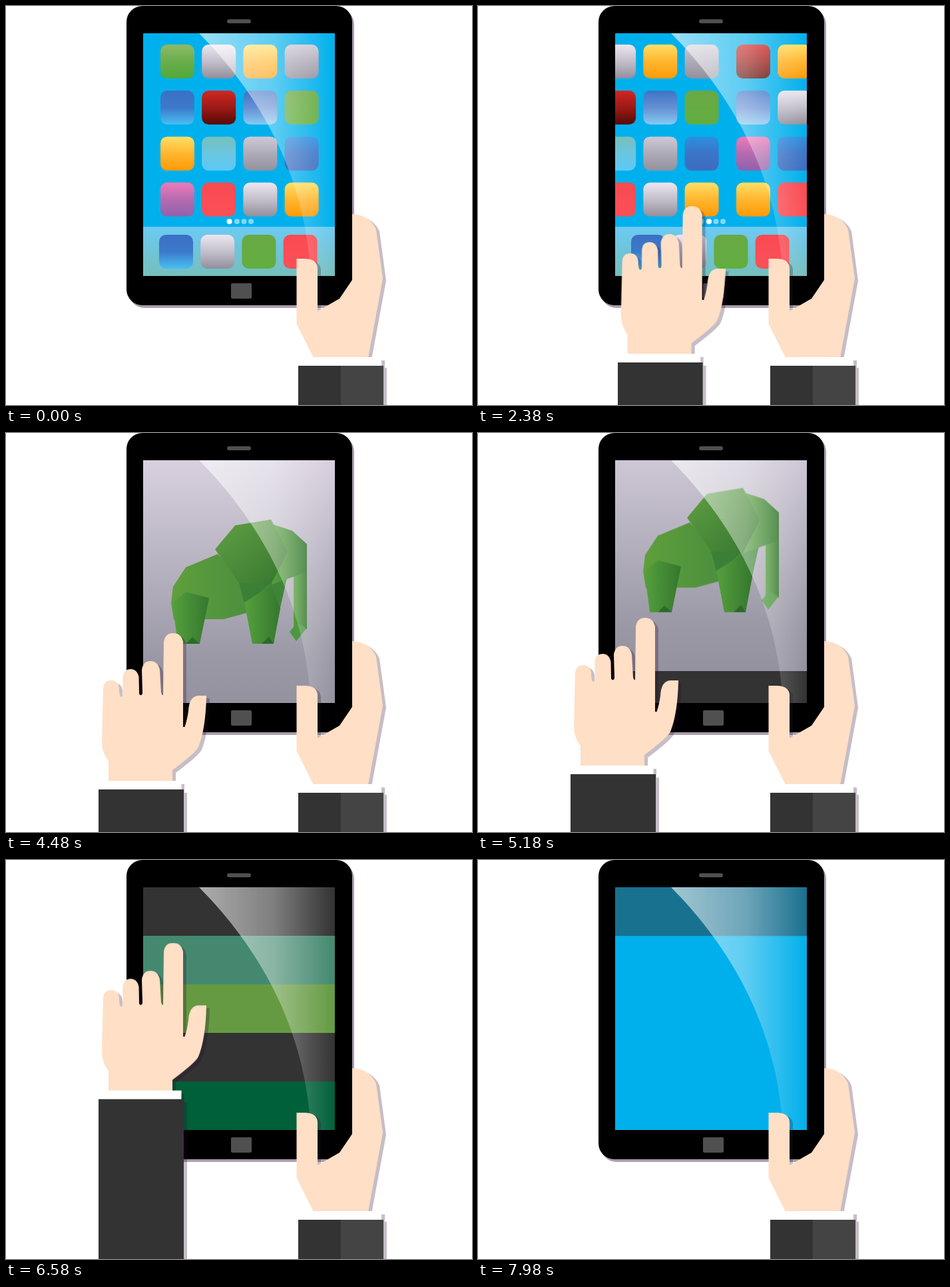
Write an HTML page that moves like this. It is 700 px wide and 600 px high and loops after 8 s.

```html
<!DOCTYPE html>
<html lang="en">
<head>
<meta charset="utf-8">
<title>Tablet gestures</title>
<style>
  html, body { margin: 0; width: 100%; height: 100%; overflow: hidden; background: #fff; }
  svg { display: block; width: 100%; height: 100%; }

  .anim { animation: 8s linear infinite; }
  .skin { fill: #ffdfc5; }
  .shade { fill: #2b0c30; opacity: .27; }

  #hand-y { animation-name: hand-y; }
  #hand-x { animation-name: hand-x; }
  #pages { animation-name: pages; }
  #home { animation-name: home; }
  #dot-1 { animation-name: dot-1; }
  #dot-2 { animation-name: dot-2; }
  #scroll { animation-name: scroll; }
  #card { animation-name: card; transform-origin: 350px 223.5px; }
  #card-fade { animation-name: card-fade; }

  @keyframes hand-y {
    0%, 3% { transform: translateY(310px); animation-timing-function: cubic-bezier(.8, 0, .68, 1); }
    17.5% { transform: translateY(0); }
    56% { transform: translateY(0); animation-timing-function: cubic-bezier(.8, 0, .68, 1); }
    77% { transform: translateY(-176.5px); }
    82% { transform: translateY(-176.5px); animation-timing-function: cubic-bezier(.8, 0, .68, 1); }
    96.25%, 100% { transform: translateY(310px); }
  }
  @keyframes hand-x {
    0%, 17.5% { transform: translateX(119.5px); animation-timing-function: cubic-bezier(.8, 0, .68, 1); }
    36.75%, 100% { transform: translateX(0); }
  }
  @keyframes pages {
    0%, 17.5% { transform: translateX(0); animation-timing-function: cubic-bezier(.8, 0, .68, 1); }
    36.75%, 100% { transform: translateX(-264px); }
  }
  @keyframes scroll {
    0%, 56% { transform: translateY(0); animation-timing-function: cubic-bezier(.8, 0, .68, 1); }
    77%, 100% { transform: translateY(-365px); }
  }
  @keyframes home {
    0%, 54.99% { visibility: visible; }
    55%, 100% { visibility: hidden; }
  }
  @keyframes dot-1 { 0%, 17.5% { opacity: 1; } 19.5%, 100% { opacity: .5; } }
  @keyframes dot-2 { 0%, 21% { opacity: .5; } 24%, 100% { opacity: 1; } }
  @keyframes card {
    0%, 39.375% { transform: scale(0); animation-timing-function: cubic-bezier(.16, 1, .3, 1); }
    47%, 100% { transform: scale(1); }
  }
  @keyframes card-fade { 0%, 39.375% { opacity: 0; } 41.1% { opacity: .94; } 44%, 100% { opacity: 1; } }
</style>
</head>
<body>
<svg viewBox="0 0 700 600">
  <defs id="defs">
    <clipPath id="screen"><rect x="206" y="41" width="288" height="365"/></clipPath>
    <linearGradient id="gloss" gradientUnits="userSpaceOnUse" x1="290" x2="494" y1="0" y2="0">
      <stop stop-color="#fff" stop-opacity=".6"/>
      <stop offset=".55" stop-color="#fff" stop-opacity=".37"/>
      <stop offset="1" stop-color="#fff" stop-opacity="0"/>
    </linearGradient>
    <linearGradient id="paper" x2="0" y2="1">
      <stop stop-color="#d8d0df"/>
      <stop offset=".82" stop-color="#9a98a5"/>
      <stop offset="1" stop-color="#94929f"/>
    </linearGradient>
    <linearGradient id="hide"><stop stop-color="#5f9f3c"/><stop offset="1" stop-color="#468a3e"/></linearGradient>
    <linearGradient id="leg"><stop stop-color="#55a03c"/><stop offset="1" stop-color="#35772f"/></linearGradient>
    <linearGradient id="ear" y2="1"><stop stop-color="#62a043"/><stop offset="1" stop-color="#35762f"/></linearGradient>
    <path id="left-skin" d="M154 524V494Q144 480 144 465L146 384Q147 372 158 372T170 384Q170 396 173 397Q176 396 175.500 390V366Q177 355 187 355T199.500 367L200 392Q201 395 203 394Q205 394 205 390L204 356Q206 343 217 343T231 356L233 390Q234 395 236 394L237 314Q239 301 251 301T266 314V442H268.500Q272 432 274 418Q275 395 290 395H301Q300 445 289 472Q286 480 250 507V524Z"/>
    <path id="right-skin" d="M436.500 380H450Q468 381 468 395V459L501 440L520 412V313Q546 314 556 336L566 410L544 529H462L436.500 478Z"/>
  </defs>

  <rect x="184" y="4" width="339" height="450" rx="24" fill="#2b0c30" opacity=".4"/>
  <rect x="181" width="339" height="450" rx="24"/>
  <rect x="332" y="20" width="36" height="6" rx="3" fill="#505050"/>
  <rect x="338" y="417" width="31" height="23" rx="2" fill="#505050"/>

  <g clip-path="url(#screen)">
    <rect x="206" y="41" width="288" height="365" fill="#00b0ec"/>
    <g id="home" class="anim">
      <g id="pages" class="anim"></g>
      <g fill="#fff">
        <circle id="dot-1" class="anim" cx="335.500" cy="324" r="4"/>
        <circle id="dot-2" class="anim" cx="347" cy="324" r="4"/>
        <circle cx="357.500" cy="324" r="4" opacity=".5"/>
        <circle cx="368" cy="324" r="4" opacity=".5"/>
      </g>
      <g id="dock"></g>
    </g>
    <g id="scroll" class="anim">
      <g id="card" class="anim"><g id="card-fade" class="anim">
        <rect x="206" y="41" width="288" height="365" fill="url(#paper)"/>
        <g transform="translate(0 49)">
          <path fill="url(#hide)" d="M270 153L318 133L350 168L400 176L395 195L360 222L327 231H300L290 235L252 232L248 207L251 182Z"/>
          <path fill="#2f7434" d="M350 176H398L380 192L358 206Z" opacity=".55"/>
          <path fill="#3f8539" d="M398 179L422 169L411 218L404 230Z"/>
          <path fill="url(#leg)" d="M250 206L270 190L305 199L291 268H258Z"/>
          <path fill="url(#leg)" d="M358 206L398 180L412 215L402 268H370Z"/>
          <path fill="#2b6a2b" d="M270 268L280 258L291 268ZM384 268L395 257L402 268Z"/>
          <path fill="url(#leg)" d="M432 163L452 157V246L432 244Z"/>
          <path fill="#4d9740" d="M438 236L451 245L436 264L426 250Z"/>
          <path fill="url(#leg)" d="M400 88L430 98L452 118V160L398 179L424 130Z"/>
          <path fill="url(#ear)" d="M344 90L398 81L424 130L398 179L350 176L314 126Z"/>
        </g>
      </g></g>
      <g id="stripes"></g>
    </g>
    <path fill="url(#gloss)" d="M290 41C378 130 450 250 458 406H494V41Z"/>
  </g>

  <g class="shade">
    <use href="#right-skin" x="5" y="3"/>
    <path d="M444 533H569V544H572V600H444Z"/>
  </g>
  <use href="#right-skin" class="skin"/>
  <rect x="439" y="528" width="125" height="14" fill="#fff"/>
  <rect x="439" y="541" width="128" height="59" fill="#333"/>
  <rect x="503" y="541" width="64" height="59" fill="#444"/>

  <g id="hand-y" class="anim"><g id="hand-x" class="anim">
    <g class="shade">
      <use href="#left-skin" x="5" y="4"/>
      <path d="M144 528H268V541H272V800H144Z"/>
    </g>
    <use href="#left-skin" class="skin"/>
    <rect x="139" y="523" width="124.500" height="14" fill="#fff"/>
    <rect x="139" y="536" width="128" height="264" fill="#333"/>
  </g></g>
</svg>
<script>
  const byId = id => document.getElementById(id);

  function add(parent, tag, attrs) {
    const el = document.createElementNS('http://www.w3.org/2000/svg', tag);
    for (const key in attrs) el.setAttribute(key, attrs[key]);
    return parent.appendChild(el);
  }

  // Vertical gradients: evenly spaced stops from top to bottom.
  const paints = {
    leaf: ['#8dbb66', '#6bad4b', '#50a93a'],
    grass: ['#6aa945', '#62ae40'],
    silver: ['#ece6f0', '#c3bfca', '#918f9c'],
    ash: ['#cec9d6', '#aeabb8', '#93919e'],
    amber: ['#ffe066', '#ffb62e', '#ff9a08'],
    blue: ['#3a70c4', '#3c79ca', '#48bff2'],
    haze: ['#3c73c5', '#6690d4', '#86caf2'],
    deep: ['#2b90e0', '#3c75c8', '#3c6cc0'],
    wine: ['#d02824', '#9c1a16', '#560a06'],
    sky: ['#76c0ba', '#6ac6e0', '#5cc9f6'],
    orchid: ['#ef7ab9', '#b56bb0', '#9062aa'],
    coral: ['#fa4a52', '#fb5058'],
    tray: ['#6ccaf3', '#70c4d8', '#75bfbc']
  };
  for (const name in paints) {
    const gradient = add(byId('defs'), 'linearGradient', { id: name, x2: 0, y2: 1 });
    paints[name].forEach((color, i, list) =>
      add(gradient, 'stop', { offset: i / (list.length - 1), 'stop-color': color }));
  }

  function addIcons(parent, x, y, names) {
    names.split(' ').forEach((name, i) => add(parent, 'rect', {
      x: x + i % 4 * 62.2, y: y + Math.floor(i / 4) * 69.2,
      width: 51, height: 51, rx: 10, fill: `url(#${name})`
    }));
  }

  addIcons(byId('pages'), 232, 58,
    'leaf silver amber ash blue wine haze grass amber sky ash deep orchid coral silver amber');
  addIcons(byId('pages'), 496, 58,
    'wine amber leaf ash haze silver blue grass orchid deep ash coral amber coral silver amber');

  add(byId('dock'), 'rect', { x: 206, y: 332, width: 288, height: 74, fill: 'url(#tray)' });
  addIcons(byId('dock'), 230, 344, 'blue silver grass coral');

  // Stripes fade one after another from the lowest up; the loop cuts the last one short.
  const loop = 8000, fade = 360;
  ['#333', '#44896f', '#659a42', '#333', '#006039'].forEach((fill, i) => {
    const stripe = add(byId('stripes'), 'rect',
      { x: 206, y: 406 + i * 73, width: 288, height: 73.2, fill });
    const start = 7800 - i * 300;
    const end = Math.min(loop, start + fade);
    const opacity = 1 - (end - start) / fade;
    stripe.animate([
      { opacity: 1, offset: 0 },
      { opacity: 1, offset: start / loop },
      { opacity, offset: end / loop },
      { opacity, offset: 1 }
    ], { duration: loop, iterations: Infinity });
  });
</script>
</body>
</html>
```
